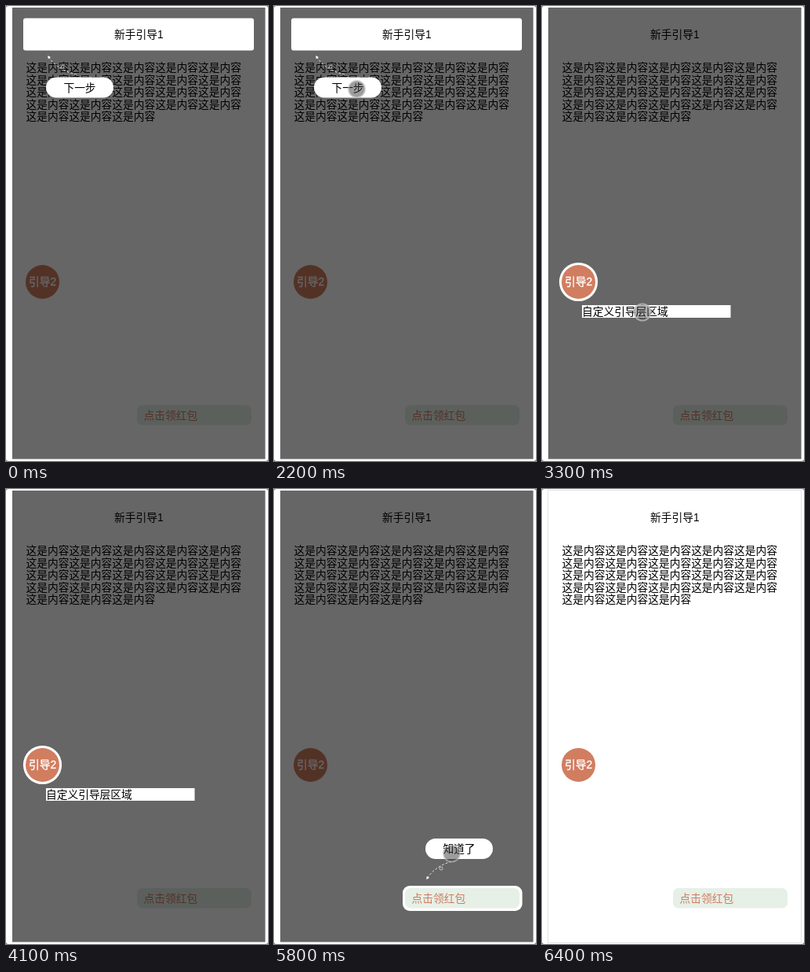
These frames come from a looping animation (334x578 px, 7 s). An HTML page with a canvas:

```html
<!DOCTYPE html>
<html lang="zh-CN">
<head>
<meta charset="utf-8">
<title>新手引导</title>
<style>
html, body { margin: 0; width: 100%; height: 100%; overflow: hidden; background: #fff; }
canvas { display: block; width: 334px; height: 578px; }
</style>
</head>
<body>
<canvas id="stage"></canvas>
<script>
const W = 334, H = 578, LOOP = 7000, SIZE = 13.72;
const FONT = `${SIZE}px "Liberation Sans", "Noto Sans CJK SC", "Noto Sans CJK", sans-serif`;
const canvas = document.getElementById('stage');
const ctx = canvas.getContext('2d');
const dpr = window.devicePixelRatio || 1;
canvas.width = W * dpr;
canvas.height = H * dpr;

function box(x, y, w, h, r, fill) {
  ctx.fillStyle = fill;
  ctx.beginPath();
  ctx.roundRect(x, y, w, h, r);
  ctx.fill();
}

function disc(x, y, r, fill) {
  ctx.fillStyle = fill;
  ctx.beginPath();
  ctx.arc(x, y, r, 0, Math.PI * 2);
  ctx.fill();
}

// y is the vertical middle of the glyphs
function label(str, x, y, color = '#000', align = 'left') {
  ctx.fillStyle = color;
  ctx.textAlign = align;
  ctx.fillText(str, x, y + SIZE * 0.37);
}

function button(str, x, y) {
  box(x, y, 86, 26, 13, '#fff');
  label(str, x + 43, y + 13, '#000', 'center');
}

// Dashed pointer with its tip at x, y; flip = -1 mirrors it vertically
function pointer(x, y, flip) {
  ctx.save();
  ctx.translate(x, y);
  ctx.scale(1, flip);
  ctx.strokeStyle = 'rgba(255,255,255,.85)';
  ctx.lineWidth = 0.9;
  ctx.setLineDash([3, 2]);
  ctx.beginPath();
  ctx.moveTo(36, -23);
  ctx.bezierCurveTo(22, -20, 8, -13, 0, 0);
  ctx.stroke();
  ctx.setLineDash([]);
  ctx.lineWidth = 0.7;
  ctx.beginPath();
  ctx.arc(18, -13, 2, 0, Math.PI * 2);
  ctx.stroke();
  ctx.fillStyle = '#fff';
  ctx.beginPath();
  ctx.moveTo(-0.8, 1);
  ctx.lineTo(-0.2, -3.2);
  ctx.lineTo(3, -1);
  ctx.fill();
  ctx.restore();
}

function title() {
  label('新手引导1', 169.3, 36, '#000', 'center');
}

function badge() {
  disc(46.5, 350.5, 21.5, '#d17d60');
  label('引导2', 46.5, 350.2, '#fff', 'center');
  ctx.strokeStyle = '#fff';
  ctx.lineWidth = 0.35;
  ctx.strokeText('引导2', 46.5, 350.2 + SIZE * 0.37);
}

function gift() {
  box(167, 507, 146, 25.5, 7, '#e6f0e6');
  label('点击领红包', 175.5, 520, '#cf7b62');
}

function page(step) {
  ctx.fillStyle = '#777';
  ctx.fillRect(0, 0, W, H);
  box(0, 0, W, H, 3, '#fff');
  title();
  for (let i = 0; i < 5; i++) {
    label('这是内容'.repeat(i < 4 ? 5 : 3), 25.5, 78 + i * 15.5);
  }
  badge();
  gift();

  if (step === 0) {
    ctx.strokeStyle = '#e2e2e2';
    ctx.lineWidth = 1;
    ctx.strokeRect(7.5, 1.5, 323, 575);
    return;
  }

  ctx.fillStyle = 'rgba(0,0,0,.6)';
  ctx.fillRect(8, 2, 322.5, 573.5);
  if (step === 1) {
    box(22, 15.5, 294, 41, 3, '#fff');
    title();
    pointer(54, 64, -1);
    button('下一步', 51, 90.5);
  } else if (step === 2) {
    disc(46.5, 350.5, 24.6, '#fff');
    badge();
    box(51, 380, 189.5, 16, 0, '#fff');
    label('自定义引导层区域', 51, 388);
  } else {
    box(164, 504, 152.5, 32, 9, '#fff');
    gift();
    pointer(195, 495, 1);
    button('知道了', 193, 444);
  }
}

function arrow(x, y) {
  const pts = [[0, 0], [0, 14.5], [3.4, 11.4], [6, 17], [8.6, 15.8], [6.2, 10.5], [10.6, 10.3]];
  ctx.beginPath();
  pts.forEach(([px, py]) => ctx.lineTo(x + px, y + py));
  ctx.closePath();
  ctx.lineJoin = 'round';
  ctx.lineWidth = 2;
  ctx.strokeStyle = '#fff';
  ctx.stroke();
  ctx.fillStyle = '#000';
  ctx.fill();
}

function ring(x, y, pressed) {
  disc(x, y, 10.5, pressed ? 'rgba(60,60,60,.5)' : 'rgba(60,60,60,.4)');
  ctx.strokeStyle = pressed ? 'rgba(190,190,190,.6)' : 'rgba(185,185,185,.85)';
  ctx.lineWidth = 2;
  ctx.beginPath();
  ctx.arc(x, y, 10.5, 0, Math.PI * 2);
  ctx.stroke();
}

const easeOut = p => 1 - (1 - p) ** 2;
const easeInOut = p => p * p * (3 - 2 * p);

function travel(t, start, end, from, to, ease) {
  const p = ease(Math.min(1, Math.max(0, (t - start) / (end - start))));
  return from.map((v, i) => v + (to[i] - v) * p);
}

function cursor(t) {
  if (t >= 500 && t < 2200) {
    arrow(...travel(t, 500, 900, [152, 207], [105.5, 105.5], easeOut));
  } else if (t >= 2200 && t < 3400) {
    ring(...travel(t, 2550, 3300, [105.5, 105.5], [128, 389], easeInOut), t < 2300);
  } else if (t >= 3400 && t < 3900) {
    ring(...travel(t, 3400, 3850, [128, 389], [246, 323], easeInOut));
  } else if (t >= 5300 && t < 5900) {
    ring(...travel(t, 5300, 5600, [287, 460], [226.5, 463], easeOut), t >= 5800);
  } else if (t >= 5900 && t < 6400) {
    ring(...travel(t, 5900, 6400, [226.5, 463], [345, 490], easeInOut));
  }
}

function stepAt(t) {
  if (t < 2300) return 1;
  if (t < 4600) return 2;
  return t < 5900 ? 3 : 0;
}

function draw(now) {
  const t = now % LOOP;
  ctx.setTransform(dpr, 0, 0, dpr, 0, 0);
  ctx.font = FONT;
  page(stepAt(t));
  ctx.save();
  ctx.beginPath();
  ctx.rect(8, 2, 323, 575);
  ctx.clip();
  cursor(t);
  ctx.restore();
}

const began = performance.now();
function tick() {
  draw(performance.now() - began);
  requestAnimationFrame(tick);
}
tick();
</script>
</body>
</html>
```
